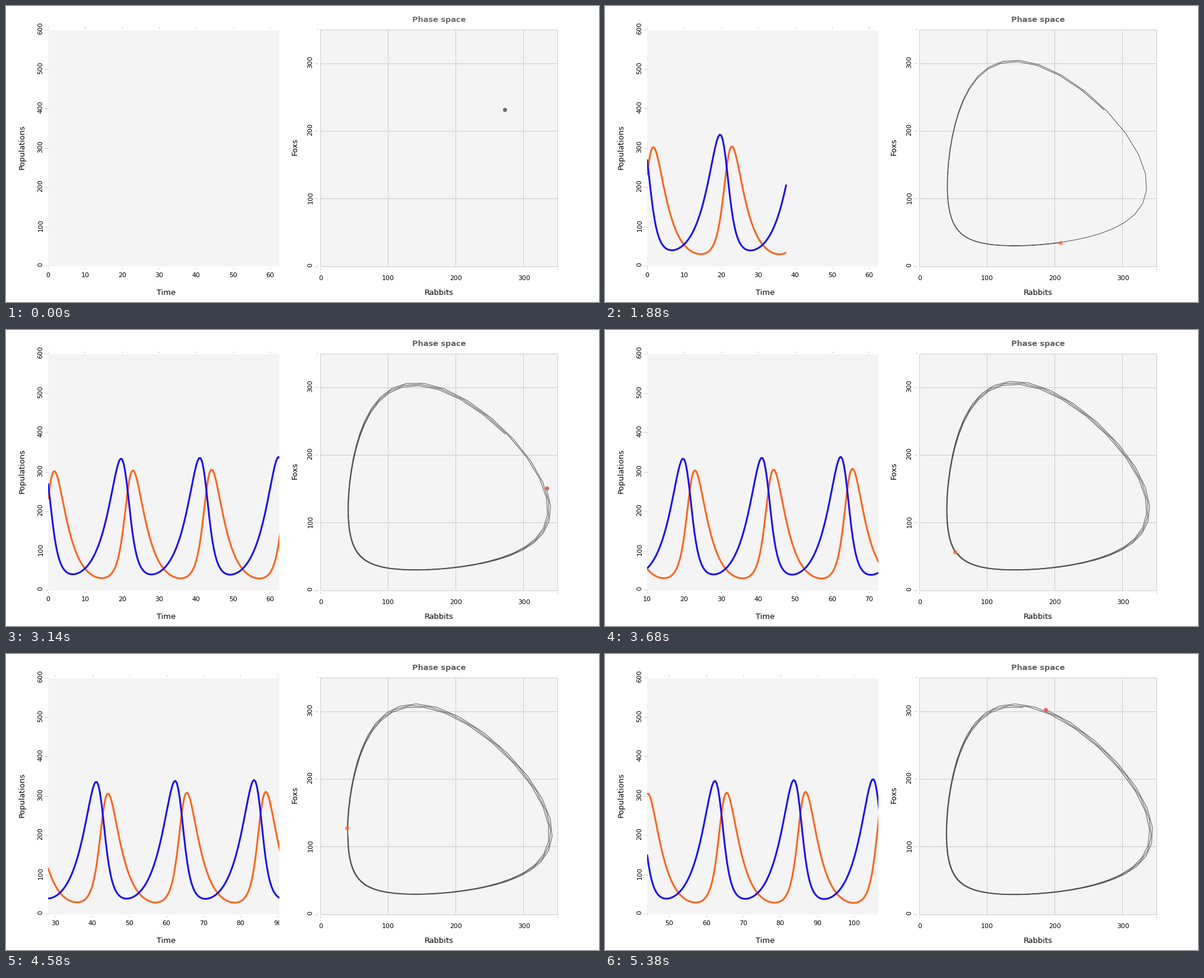
Recreate the animation shown at these times as a matplotlib script. Size 1000 by 500 pixels, loop 5.4 s.

```python
import numpy as np
import matplotlib.pyplot as plt
from matplotlib.animation import FuncAnimation
from matplotlib.patches import Rectangle

W, H, DPI = 1000, 500, 100
FRAMES, STEP_MS = 270, 20
DT, SUBSTEPS = 0.4, 50      # time per frame, Euler steps within it
TAIL = 159                  # frames kept in view
SPAN = 62.5                 # width of the time axis
PX = 72 / DPI               # one pixel in points

PANEL, GRID, TITLE = '#f4f4f4', '#cccccc', '#606060'
BLUE, ORANGE = '#1a0ff2', '#fb651d'
DOT_LOW, DOT_HIGH, DOT_FIRST = '#ff6a20', '#f53c32', '#6e6e6e'

plt.rcParams['font.family'] = 'DejaVu Sans'


def simulate(rabbit=272.0, fox=232.0):
    """Predator-prey model, one row per frame."""
    birth, hunt, death, feed = 0.3, 0.0025, 0.35, 0.0025
    h = DT / SUBSTEPS
    rows = [(rabbit, fox)]
    for _ in range(FRAMES - 1):
        for _ in range(SUBSTEPS):
            dr = rabbit * (birth - hunt * fox)
            df = fox * (feed * rabbit - death)
            rabbit += h * dr
            fox += h * df
        rows.append((rabbit, fox))
    return np.array(rows)


rabbits, foxes = simulate().T
times = np.arange(FRAMES) * DT

fig = plt.figure(figsize=(W / DPI, H / DPI), dpi=DPI, facecolor='white')


def panel(x0, y0, x1, y1, xmax, ymax):
    ax = fig.add_axes([x0 / W, 1 - y1 / H, (x1 - x0) / W, (y1 - y0) / H])
    ax.set(xlim=(0, xmax), ylim=(0, ymax), xticks=[], yticks=[], facecolor=PANEL)
    return ax


left = panel(71, 41, 461, 440, SPAN, 600)
left.spines[:].set_visible(False)
right = panel(530.5, 40.5, 930.5, 440.5, 350, 350)
right.spines[:].set(color=GRID, linewidth=PX, snap=False)
nudge = 7 / 8               # one pixel, so grid lines snap down
for v in (100, 200, 300):
    right.axvline(v - nudge, color=GRID, lw=PX, zorder=1)
    right.axhline(v + nudge, color=GRID, lw=PX, zorder=1)

# Overlay in pixel units for all labels
over = fig.add_axes([0, 0, 1, 1])
over.set(xlim=(0, W), ylim=(H, 0))
over.axis('off')


def label(x, y, text, size=11, turn=0, **kw):
    return over.text(x, y, text, fontsize=size * PX, rotation=turn, ha='center',
                     va='baseline', rotation_mode='anchor', **kw)


def specks(xs, ys):
    return over.plot(xs, ys, ls='none', marker=',', color='#777777')[0]


title = label(730.5, 27, 'Phase space', 13, weight='bold', color=TITLE)
label(270, 488, 'Time', 13)
label(730, 488, 'Rabbits', 13)
label(31, 238, 'Populations', 13, 90)
label(491, 238, 'Foxs', 13, 90)

for v in range(0, 601, 100):
    y = 440 - v * 0.665
    label(61.5, y - 3, str(v), turn=90)
    specks([67, 70], [y, y])
for v in range(0, 301, 100):
    x, y = 530.5 + v * 8 / 7, 440.5 - v * 8 / 7
    label(x, 463, str(v))
    label(516.5, y - 3, str(v), turn=90)
    specks([522, 525], [y, y])
specks([525, 530, 930], [40, 445, 445])

time_labels = [label(0, 458, '') for _ in range(7)]
time_specks = specks([], [])
over.add_patch(Rectangle((461, 445), 14, 20, color='white', lw=0, zorder=5))

style = dict(lw=3 * PX, solid_capstyle='butt', solid_joinstyle='round')
fox_line, = left.plot([], [], color=ORANGE, **style)
rabbit_line, = left.plot([], [], color=BLUE, **style)
orbit, = right.plot([], [], color='black', alpha=0.65, lw=PX, zorder=3)
dot, = right.plot([], [], 'o', ms=7 * PX, mew=0, zorder=4)


def update(n):
    first = max(0, n - TAIL)
    view = slice(first, n + 1)
    start = times[first]

    left.set_xlim(start, start + SPAN)
    fox_line.set_data(times[view], foxes[view])
    rabbit_line.set_data(times[view], rabbits[view])
    orbit.set_data(rabbits[view], foxes[view])

    dot.set_data([rabbits[n]], [foxes[n]])
    dot.set_color(DOT_FIRST if n == 0 else DOT_HIGH if foxes[n] > 140 else DOT_LOW)
    dot.set_alpha(1 if n == 0 else 0.75)
    title.set_color(DOT_FIRST if n == 0 else TITLE)

    tick = int(np.ceil(start / 10 - 1e-6)) * 10
    xs = []
    for item in time_labels:
        shown = tick <= start + SPAN
        x = 71 + (tick - start) * 390 / SPAN
        item.set_visible(shown)
        item.set_text(str(tick))
        item.set_x(x)
        if shown:
            xs.append(x)
        tick += 10
    time_specks.set_data(xs * 2, [38] * len(xs) + [444] * len(xs))
    return ()


anim = FuncAnimation(fig, update, frames=FRAMES, interval=STEP_MS,
                     init_func=lambda: update(0), repeat=True, repeat_delay=0)
plt.show()
```
